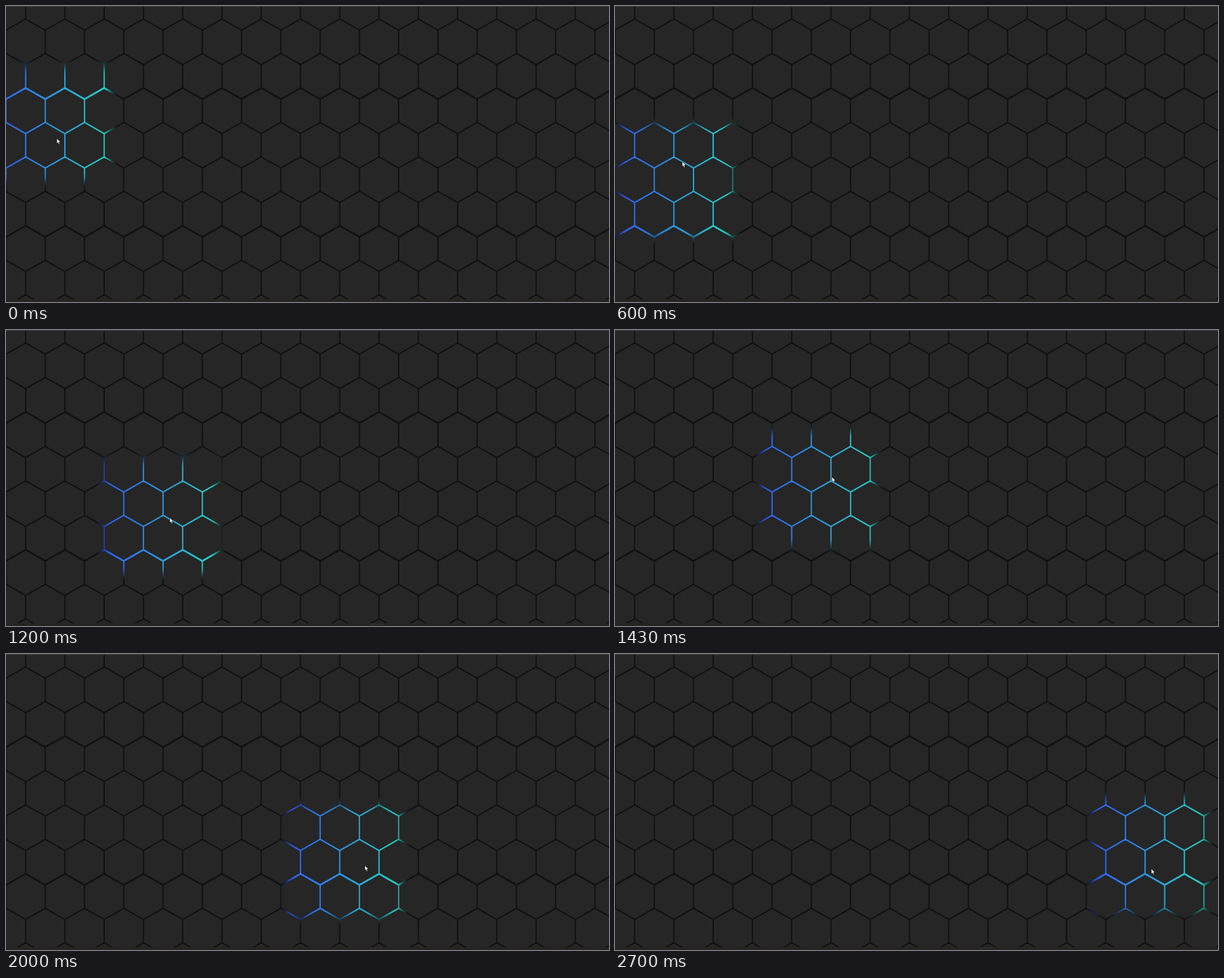
An HTML page for the animation above (2.73 s loop, 1067 by 525 pixels).

```html
<!DOCTYPE html>
<html lang="en">
<head>
<meta charset="utf-8">
<title>Hexagon glow</title>
<style>
  html, body { margin: 0; width: 100%; height: 100%; overflow: hidden; background: #262626; }
  svg { display: block; }
</style>
</head>
<body>
<svg width="1067" height="525" viewBox="0 0 1067 525">
  <defs>
    <g id="net" fill="none"></g>
    <mask id="lines" maskUnits="userSpaceOnUse" x="0" y="0" width="1067" height="525">
      <use href="#net" stroke="#fff"/>
    </mask>
    <linearGradient id="hue">
      <stop offset="0" stop-color="#335bf4"/>
      <stop offset="1" stop-color="#2ad6c4"/>
    </linearGradient>
    <filter id="soft" x="-20%" y="-20%" width="140%" height="140%" color-interpolation-filters="sRGB">
      <feGaussianBlur stdDeviation="7"/>
    </filter>
  </defs>
  <rect width="1067" height="525" fill="#262626"/>
  <use href="#net" stroke="#121212"/>
  <g mask="url(#lines)">
    <rect id="glow" x="-101" y="-101" width="202" height="202" fill="url(#hue)" filter="url(#soft)"/>
  </g>
  <rect width="1067" height="1.5" fill="#3b3b3b"/>
  <rect y="520" width="1067" height="5" fill="#262323"/>
  <rect x="643" y="521" width="24" height="1.5" fill="#343232"/>
  <path id="cursor" d="M0 0V8.8L2 7.2L3.5 10.4L5 9.7L3.6 6.7L6.2 6.3Z"
        fill="#f4f4f4" stroke="#111" stroke-width=".6"/>
</svg>
<script>
const LOOP = 2730, LEAD = 60;
const HALF = 34.74, PITCH = 61.15, TOP = 23, RISE = 19.8;

// Glow centre: time, x, y. The pointer runs LEAD ms ahead on the same path.
const PATH = [
  [0, 83, 209], [60, 90, 235], [200, 95, 303], [380, 98, 340], [530, 101, 334],
  [600, 108, 310], [660, 119, 276], [850, 170, 222], [1070, 234, 303],
  [1200, 273, 331.5], [1260, 290, 333], [1600, 427, 227], [1700, 454, 213],
  [1760, 481, 225], [2000, 599, 367], [2035, 620, 379], [2060, 635, 375],
  [2130, 681, 361], [2330, 791, 238], [2390, 825, 219], [2450, 849, 214],
  [2660, 935, 313], [2700, 946, 355], [2760, 949, 381]
];

const $ = id => document.getElementById(id);

function addLine(d, width) {
  const p = document.createElementNS("http://www.w3.org/2000/svg", "path");
  p.setAttribute("d", d);
  p.setAttribute("stroke-width", width);
  $("net").append(p);
}

function buildNet() {
  let posts = "";
  for (let row = -1; row < 9; row++) {
    const y = TOP + row * PITCH;
    let zigzag = "";
    for (let i = -1; i < 33; i++) {
      const x = (i * HALF).toFixed(2);
      const low = (i + row) % 2 === 0;
      zigzag += (zigzag ? "L" : "M") + x + " " + (y + (low ? RISE : 0));
      if (low) posts += `M${x} ${y + RISE}V${y + PITCH}`;
    }
    addLine(zigzag, row === 2 || row === 6 ? 3.1 : 2.5);
  }
  addLine(posts, 2.3);
}

function slope(i, c) {
  const a = PATH[Math.max(i - 1, 0)], b = PATH[Math.min(i + 1, PATH.length - 1)];
  return (b[c] - a[c]) / (b[0] - a[0]);
}

function at(t, c) {
  let i = 0;
  while (i < PATH.length - 2 && PATH[i + 1][0] <= t) i++;
  const a = PATH[i], b = PATH[i + 1], d = b[0] - a[0];
  const u = Math.min((t - a[0]) / d, 1), v = 1 - u;
  return v * v * (1 + 2 * u) * a[c] + u * u * (3 - 2 * u) * b[c]
    + d * u * v * (v * slope(i, c) - u * slope(i + 1, c));
}

function place(id, t) {
  $(id).setAttribute("transform", `translate(${at(t, 1).toFixed(2)} ${at(t, 2).toFixed(2)})`);
}

function draw(now) {
  // The scene advances 30 times a second, on 10 ms boundaries.
  const tick = Math.floor((now % LOOP) / 10);
  const t = Math.round(Math.floor((tick * 3 + 1) / 10) * 10 / 3) * 10;
  place("glow", t);
  place("cursor", t + LEAD);
}

buildNet();
draw(0);
const start = performance.now();
requestAnimationFrame(function loop() {
  draw(performance.now() - start);
  requestAnimationFrame(loop);
});
</script>
</body>
</html>
```
